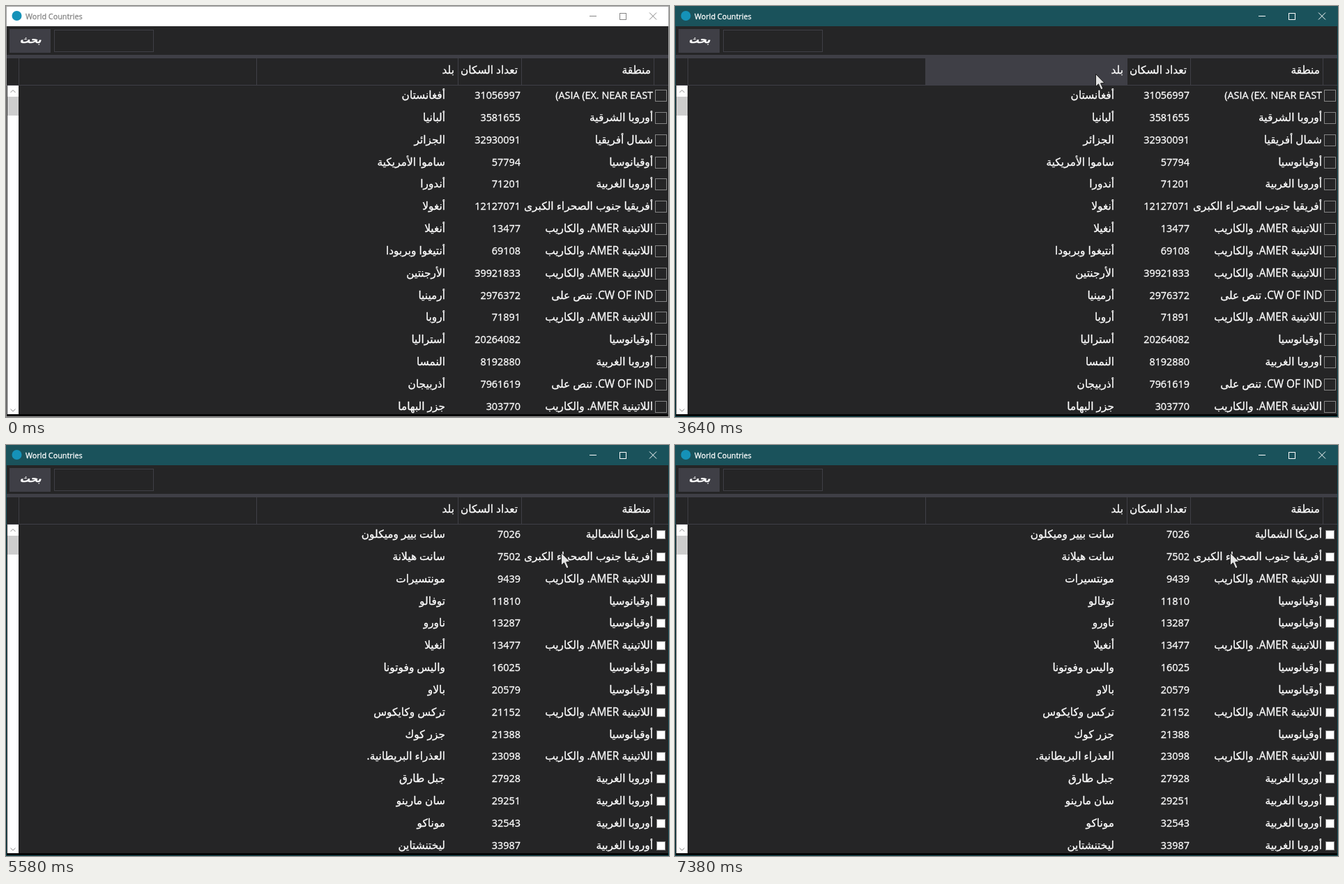
Animation of 951x589 px, one loop 8000 ms. Source, as an HTML page with a canvas:

```html
<!DOCTYPE html>
<html lang="ar">
<head>
<meta charset="utf-8">
<title>World Countries</title>
<style>
html, body { margin: 0; width: 100%; height: 100%; overflow: hidden; background: #252526; }
canvas { display: block; }
</style>
</head>
<body>
<canvas id="stage" width="951" height="589"></canvas>
<script>
const ctx = document.getElementById('stage').getContext('2d');
const LOOP = 8000, ROW = 31.84;
const PANEL = '#252526', ACCENT = '#3f3f46', FONT = '"Open Sans", "DejaVu Sans", sans-serif';
const ARABIC = '15.4px', LATIN = '14.4px';

const regions = {
  // The override keeps the displaced bracket on the left
  asia: '\u202d(ASIA (EX. NEAR EAST\u202c',
  east: 'أوروبا الشرقية',
  west: 'أوروبا الغربية',
  northAfrica: 'شمال أفريقيا',
  subSahara: 'أفريقيا جنوب الصحراء الكبرى',
  oceania: 'أوقيانوسيا',
  latin: 'اللاتينية AMER. والكاريب',
  cis: 'CW OF IND. تنص على',
  northAmerica: 'أمريكا الشمالية'
};

const byName = [
  ['أفغانستان', 31056997, 'asia'],
  ['ألبانيا', 3581655, 'east'],
  ['الجزائر', 32930091, 'northAfrica'],
  ['ساموا الأمريكية', 57794, 'oceania'],
  ['أندورا', 71201, 'west'],
  ['أنغولا', 12127071, 'subSahara'],
  ['أنغيلا', 13477, 'latin'],
  ['أنتيغوا وبربودا', 69108, 'latin'],
  ['الأرجنتين', 39921833, 'latin'],
  ['أرمينيا', 2976372, 'cis'],
  ['أروبا', 71891, 'latin'],
  ['أستراليا', 20264082, 'oceania'],
  ['النمسا', 8192880, 'west'],
  ['أذربيجان', 7961619, 'cis'],
  ['جزر البهاما', 303770, 'latin']
];

const byPopulation = [
  ['سانت بيير وميكلون', 7026, 'northAmerica'],
  ['سانت هيلانة', 7502, 'subSahara'],
  ['مونتسيرات', 9439, 'latin'],
  ['توفالو', 11810, 'oceania'],
  ['ناورو', 13287, 'oceania'],
  ['أنغيلا', 13477, 'latin'],
  ['واليس وفوتونا', 16025, 'oceania'],
  ['بالاو', 20579, 'oceania'],
  ['تركس وكايكوس', 21152, 'latin'],
  ['جزر كوك', 21388, 'oceania'],
  ['العذراء البريطانية.', 23098, 'latin'],
  ['جبل طارق', 27928, 'west'],
  ['سان مارينو', 29251, 'west'],
  ['موناكو', 32543, 'west'],
  ['ليختنشتاين', 33987, 'west'],
  ['سانت كيتس ونيفيس', 39129, 'latin'],
  ['جزر كايمان', 45436, 'latin'],
  ['جزر صناعية', 47246, 'west'],
  ['الأرض الخضراء', 56361, 'northAmerica'],
  ['ساموا الأمريكية', 57794, 'oceania'],
  ['جزر مارشال', 60422, 'oceania'],
  ['برمودا', 65773, 'northAmerica'],
  ['دومينيكا', 68910, 'latin'],
  ['أنتيغوا وبربودا', 69108, 'latin']
];

// Pointer moves: first step, last step, step count, start point, end point
const moves = [
  [360, 595, 4, [675, 555], [350, 250]],
  [673, 830, 3, [350, 250], [489, 113]],
  [3010, 3010, 1, [489, 113], [496, 111]],
  [3340, 3640, 5, [496, 111], [603, 97]],
  [3730, 3870, 3, [603, 97], [660, 97]],
  [4100, 4200, 2, [660, 97], [668, 94]],
  [5270, 5580, 5, [668, 94], [796, 154]]
];

// Time and first visible row
const scrolls = [[0, 0], [5910, 3], [6140, 6], [6450, 9], [7070, 6], [7150, 3], [7380, 0]];

function pointerAt(t) {
  const move = moves.findLast(m => t >= m[0]);
  if (!move) return null;
  const [start, end, steps, from, to] = move;
  const gap = (end - start) / Math.max(1, steps - 1) || 1;
  const done = Math.min(steps, Math.floor((t - start) / gap + 1e-6) + 1) / steps;
  return from.map((v, i) => Math.round(v + (to[i] - v) * done));
}

function box(x, y, w, h, color) {
  ctx.fillStyle = color;
  ctx.fillRect(x, y, w, h);
}

function frame(x, y, w, h, color) {
  ctx.strokeStyle = color;
  ctx.strokeRect(x + .5, y + .5, w - 1, h - 1);
}

function line(color, ...points) {
  ctx.strokeStyle = color;
  ctx.beginPath();
  points.forEach(p => ctx.lineTo(...p));
  ctx.stroke();
}

// A hairline stroke gives the letters their crisp, slightly heavy look
function text(value, x, y, { color = '#fff', font, align = 'right' } = {}) {
  ctx.font = `${font || (/[\u0600-\u06ff]/.test(value) ? ARABIC : LATIN)} ${FONT}`;
  ctx.fillStyle = ctx.strokeStyle = color;
  ctx.textAlign = align;
  ctx.direction = align === 'left' ? 'ltr' : 'rtl';
  ctx.fillText(value, x, y);
  ctx.lineWidth = .3;
  ctx.strokeText(value, x, y);
  ctx.lineWidth = 1;
}

function drawTitleBar(active) {
  const ink = active ? '#fff' : '#858585';
  box(0, 0, 951, 29, active ? '#1a525b' : '#fff');
  ctx.fillStyle = '#1592b8';
  ctx.beginPath();
  ctx.arc(15.5, 14, 7, 0, Math.PI * 2);
  ctx.fill();
  text('World Countries', 28, 19, { color: ink, font: '10.8px', align: 'left' });
  line(ink, [837, 14.5], [847, 14.5]);
  frame(880, 10, 10, 10, ink);
  line(ink, [923, 9.5], [933, 19.5]);
  line(ink, [933, 9.5], [923, 19.5]);
}

function drawToolbar() {
  box(5, 33, 59, 34, ACCENT);
  ctx.save();
  ctx.transform(1, 0, -.3, 1, 35, 53);
  text('بحث', 0, 0, { font: 'bold 14.4px', align: 'center' });
  ctx.restore();
  frame(69, 34, 143, 32, ACCENT);
  box(1, 70, 949, 5, ACCENT);
}

function drawHeader(pointer) {
  if (pointer && pointer[1] <= 113) {
    const [x] = pointer;
    if (x >= 359 && x < 648) box(359, 75, 290, 38, ACCENT);
    if (x >= 648 && x < 739) box(648, 75, 92, 38, ACCENT);
  }
  for (const x of [18, 359, 648, 739, 929]) box(x, 75, 1, 38, ACCENT);
  box(1, 113, 949, 1, ACCENT);
  text('بلد', 643, 97);
  text('تعداد السكان', 734, 97);
  text('منطقة', 925, 97);
}

function drawCheckbox(y, filled) {
  if (!filled) return frame(931, y - 8, 17, 17, '#858585');
  frame(933, y - 6, 13, 13, '#858585');
  box(934, y - 5, 11, 11, '#fff');
}

function drawRows(rows, first, filled) {
  ctx.save();
  ctx.beginPath();
  ctx.rect(18, 114, 932, 471);
  ctx.clip();
  rows.slice(first, first + 15).forEach(([name, population, region], i) => {
    const shift = Math.round(i * ROW);
    text(name, 630, 133 + shift);
    text(String(population), 738, 133 + shift);
    text(regions[region], 928, 133 + shift);
    drawCheckbox(128 + shift, filled);
  });
  ctx.restore();
}

function drawScrollbar(first) {
  box(2, 114, 16, 471, '#fff');
  box(2, 130 + Math.round(first * 1.85), 16, 27, '#cdcdcd');
  line('#8c8c8c', [6.5, 124], [10, 120.5], [13.5, 124]);
  line('#8c8c8c', [6.5, 577.5], [10, 581], [13.5, 577.5]);
}

function drawPointer([x, y]) {
  ctx.beginPath();
  [[.5, .5], [.5, 18.5], [4.5, 14.8], [8, 22.8], [11, 21.5], [7.6, 13.8], [13, 13.3]]
    .forEach(([dx, dy]) => ctx.lineTo(x + dx, y + dy));
  ctx.closePath();
  ctx.fillStyle = '#e2e2e2';
  ctx.fill();
  ctx.strokeStyle = '#1c1c1c';
  ctx.stroke();
}

function draw(t) {
  const active = t >= 2230, sorted = t >= 4500;
  const pointer = pointerAt(t);
  const first = scrolls.findLast(s => t >= s[0])[1];
  ctx.lineWidth = 1;
  box(0, 0, 951, 589, PANEL);
  drawTitleBar(active);
  drawToolbar();
  drawHeader(pointer);
  drawRows(sorted ? byPopulation : byName, first, sorted);
  drawScrollbar(first);
  box(1, 585, 949, 3, '#000');
  frame(0, 0, 951, 589, active ? '#1a525b' : '#a0a0a0');
  if (pointer) drawPointer(pointer);
}

function tick() {
  draw(performance.now() % LOOP);
  requestAnimationFrame(tick);
}
tick();
</script>
</body>
</html>
```
